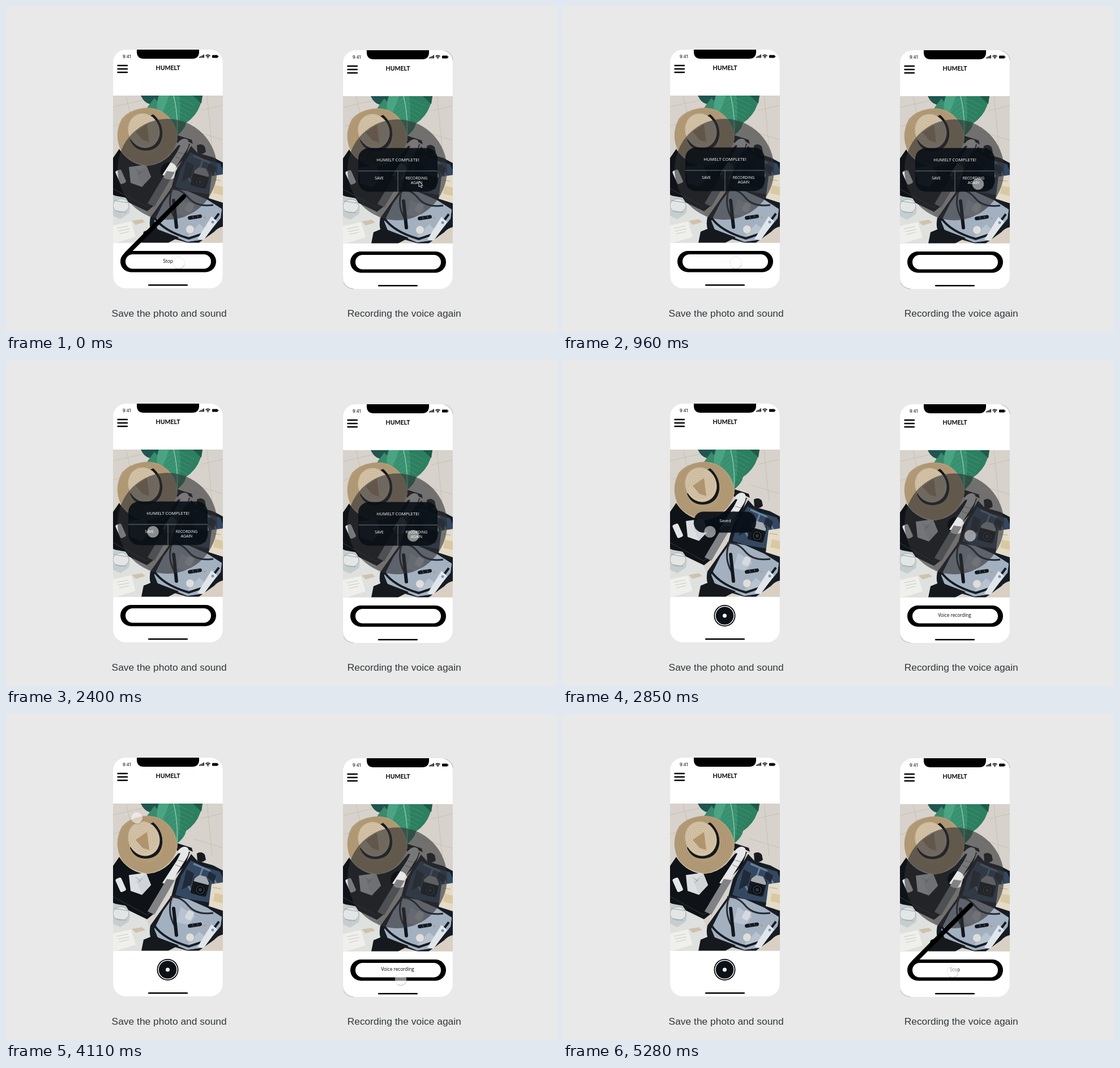
An HTML page that plays this animation: 973x575 px, repeating every 5310 ms.

```html
<!DOCTYPE html>
<html lang="en">
<head>
<meta charset="utf-8">
<title>Voice photo app</title>
<style>
  html, body { margin: 0; width: 100%; height: 100%; overflow: hidden; background: #e9e9e9; }
  svg { display: block; }
  text { font-family: "Open Sans", "Noto Sans", sans-serif; }
  .mid text { text-anchor: middle; }
  .caption { font: 17.4px "Liberation Sans", Arial, sans-serif; fill: #32383c; }
  .title { font: 700 10.6px Lato, sans-serif; text-anchor: middle; }
  .mid .clock, .clock { font: 7.5px Inter, sans-serif; text-anchor: start; }
</style>
</head>
<body>
<svg id="stage" width="973" height="575" viewBox="0 0 973 575"></svg>
<script>
const LOOP = 5310;
const BRAND = "HUMELT";
const stage = document.getElementById("stage");
const repeat = (n, draw) => Array.from({ length: n }, (_, i) => draw(i)).join("");

const floor = `
  <rect x="189" y="158" width="194" height="260" fill="#d7d2cb"/>
  <path d="M189 333L248 362 262 400 240 418H189Z" fill="#dfe1df"/>
  <path d="M383 388L340 418H383Z" fill="#d9d0c3"/>
  <g stroke="#bfb8ae" stroke-width=".7" fill="none">
    <path d="M189 178l52-12M189 212l18-6M212 158l7 30M330 220l53 16M355 158l9 92M345 184l38-9"/>
  </g>`;

const leaves = `
  <path d="M238 158Q244 171 254 173L249 181Q250 192 257 198L280 178 284 158Z" fill="#1f5650"/>
  <path d="M249 180Q251 193 260 199L274 176 262 162Z" fill="#3a8a6c"/>
  <path d="M270 158Q262 180 272 197Q274 206 286 209Q290 224 302 228Q311 223 318 206Q336 194 343 174L347 158Z" fill="#379070"/>
  <path d="M306 158Q311 188 303 227Q316 218 318 206Q336 194 343 174L347 158Z" fill="#2c7f60"/>
  <path d="M330 158L345 172 347 158Z" fill="#1d5b47"/>
  <path d="M270 158Q262 180 272 197L281 177 288 158Z" fill="#4aa382"/>
  <g fill="none" stroke="#7cc39a" stroke-width=".5" opacity=".6">
    ${repeat(7, i => `<path d="M${299 + i * .4} ${161 + i * 8}q-14 7 -${25 - i * 2.5} ${20 - i}M${302 + i * .3} ${161 + i * 8}q13 5 ${31 - i * 3.6} ${14 - i}"/>`)}
  </g>
  <path d="M296 158Q304 190 302 227" fill="none" stroke="#9dd0b3" stroke-width="1.2"/>`;

const luggage = `
  <path d="M200 252Q213 274 239 281Q266 285 288 265L304 246 325 243 316 268 298 286 263 351 249 362 189 333V268Z" fill="#0f1317"/>
  <path d="M189 322L248 354 260 347" fill="none" stroke="#2b3034" stroke-width="1.2"/>
  <path d="M301 240L303 228 328 236 330 243 315 236 307 244Z" fill="#171a1d"/>
  <path d="M303 242Q312 230 321 236Q326 244 317 257L300 284Q296 297 284 301L276 298 302 258 308 246Z" fill="#e6e7e7"/>
  <path d="M304 258l11 3M299 266l10 4" stroke="#888" stroke-width="1"/>
  <path d="M284 291L298 293 262 354 250 348Z" fill="#808285"/>
  <path d="M217 284L247 280 256 301 240 319 220 312Z" fill="#dcdfe1"/>
  <path d="M230 294L248 281 256 302 240 319Z" fill="#d0d4d8"/>
  <path d="M229 288l9 7m-5 3l7-8" stroke="#959a9e"/>
  <rect x="197" y="289" width="11" height="25" rx="3" transform="rotate(-24 202 301)" fill="#e4e6e7"/>
  <path d="M337 246q8-5 14 2l2 9q-7 7-15 2z" fill="#171b20"/>`;

const bag = `
  <path d="M327 247L338 259 366 267 383 276V389Q374 391 368 398L340 418H322L260 400Q251 393 255 373L292 321 300 291Z" fill="#161c23"/>
  <path d="M326 258L348 269 378 278 383 289V312L362 333 320 326 299 319 309 286Z" fill="#344861"/>
  <path d="M331 264l28 12 16 30M315 291l14 24M348 270l-7 20" fill="none" stroke="#6a84a0" stroke-width="3"/>
  <path d="M319 274l13 7-5 20-17 9zM359 277l12 8-4 13-12-10z" fill="#202a38"/>
  <path id="cloth" d="M296 322L322 327 356 342 381 358 379 374 348 412 320 416 268 394 262 379 278 347Z" fill="#a3b0c0"/>
  <use href="#cloth" fill="url(#mesh)"/>
  <path d="M309 340l25 17-12 15-21-5zM321 405l20-21 14 12-15 12z" fill="#b9c3cf"/>
  <path d="M262 373Q278 397 323 410L350 401 376 366" fill="none" stroke="#161c23" stroke-width="4"/>
  <path d="M290 323Q308 321 322 338T366 351M293 324Q284 350 298 374" fill="none" stroke="#252c35" stroke-width="3"/>
  <path d="M296 343L301 390" stroke="#12171d" stroke-width="6" stroke-linecap="round"/>
  <rect x="321" y="369" width="25" height="6.5" rx="3" transform="rotate(-9 334 372)" fill="#151a20"/>
  <path d="M329 369l2 6m6-7l2 5" stroke="#53606f"/>
  <rect x="318" y="347" width="12" height="16" rx="3" transform="rotate(28 324 355)" fill="#d5dae0"/>
  <circle cx="325" cy="394" r="7.5" fill="#dedfdd" stroke="#aab0b5"/>
  <path d="M363 371L373 380 349 413 338 411Z" fill="#e1e6eb"/>
  <circle cx="365" cy="381" r="2.5" fill="#7d91b3"/>
  <g fill="#d78458"><circle cx="293" cy="331" r="1.5"/><circle cx="351" cy="373" r="1.5"/></g>
  <g transform="rotate(15 343 306)">
    <rect x="328" y="290" width="29" height="30" rx="4" fill="#15191d"/>
    <path d="M329 293l7-8h12l8 9v4h-27z" fill="#a5abb0"/>
    <circle cx="344" cy="310" r="10" fill="#0b0f12"/>
    <circle cx="344" cy="310" r="7" fill="none" stroke="#48525a"/>
    <circle cx="344" cy="310" r="3" fill="#283846"/>
  </g>
  <path d="M363 300L383 297V347L358 339Z" fill="#e4dbc8"/>
  <path d="M369 316L383 319V334L366 330Z" fill="#d9c9a2"/>
  <path d="M365 306l14 2" stroke="#b0a592"/>`;

const hat = `
  <path d="M237 181Q267 175 286 194Q303 211 303 235Q293 273 251 282Q214 276 202 253Q190 225 205 198Q218 184 237 181Z" fill="#b39b78"/>
  <g fill="none" stroke="#957d59" stroke-width=".7" opacity=".45">
    ${repeat(6, i => `<ellipse cx="248" cy="230" rx="${32 + i * 3.4}" ry="${34 + i * 2.7}"/>`)}
  </g>
  <path d="M219 236Q226 254 245 255Q272 255 276 229Q278 207 260 191L250 196Z" fill="#15181b"/>
  <ellipse cx="243.5" cy="220" rx="27.5" ry="31" transform="rotate(-23 243.5 220)" fill="#d3c2a6"/>
  <g fill="none" stroke="#b5a182" stroke-width=".7" opacity=".6">
    ${repeat(6, i => `<ellipse cx="242" cy="217" rx="${5 + i * 4}" ry="${6 + i * 4}" transform="rotate(-23 242 217)"/>`)}
  </g>
  <path d="M229 222L249 208 253 240 241 236Z" fill="#a4865c" opacity=".75"/>`;

const tableware = `
  <path d="M189 334L211 338Q222 351 217 366L202 376 189 370Z" fill="#c6cdce"/>
  <ellipse cx="203" cy="352" rx="14" ry="12" fill="#e3e6e5" stroke="#a4afb1"/>
  <path d="M191 343l24 4m-22 14l19 3" stroke="#98a4a7" stroke-width="1.2"/>
  <path d="M189 387L221 380 229 407 194 418H189Z" fill="#efefec"/>
  <path d="M196 392l20-4m-18 9l20-4m-18 9l17-4" stroke="#cbc9c5"/>
  <path d="M222 379l18-3 6 5-17 5z" fill="#cfc2ac"/>
  <path d="M243 398L260 391 305 408 286 418H239Z" fill="#15191d"/>`;

const chrome = `
  <rect x="189.3" y="77" width="193.4" height="421" rx="22" fill="#fff"/>
  <path d="M231 77H341V82Q340 93 329 93H243Q232 93 231 82Z"/>
  <text class="clock" x="206" y="91.5">9:41</text>
  ${repeat(4, i => `<rect x="${341 + i * 2.4}" y="${89.5 - i * 1.3}" width="1.7" height="${2 + i * 1.3}" rx=".4"/>`)}
  <path d="M352.5 88a5.5 5.5 0 0 1 8 0M354.3 89.7a3 3 0 0 1 4.4 0" fill="none" stroke="#000" stroke-width="1.3"/>
  <circle cx="356.5" cy="91.2" r="1"/>
  <rect x="364" y="86.5" width="10" height="5" rx="1.2"/><rect x="374.5" y="88" width="1" height="2"/>
  <path d="M197.5 105H214M197.5 111H214M197.5 117H214" stroke="#000" stroke-width="2.4" stroke-linecap="round"/>
  <text class="title" x="286" y="113">${BRAND}</text>
  <rect x="251" y="491" width="70" height="2.6" rx="1.3"/>
  <use href="#photo"/>`;

const phone = (id, dx, dy) => `
  <g id="${id}" class="mid" transform="translate(${dx} ${dy})">
    <use href="#chrome"/>
    <path class="disc" fill="#303032" fill-opacity=".6" fill-rule="evenodd"
      d="M197 288a88 89 0 1 0 176 0a88 89 0 1 0-176 0zM273 291a15 15 0 1 0 30 0a15 15 0 1 0-30 0z"/>
    <g class="pill">
      <rect x="202" y="432" width="169" height="37.5" rx="18.7"/>
      <path class="arm" d="M213 437H356" stroke="#000" stroke-width="8" stroke-linecap="round"/>
      <rect x="211" y="438" width="151" height="25.5" rx="12.7" fill="#fff"/>
      <text class="stop" x="286" y="452.7" font-size="8.4">Stop</text>
      <text class="voice" x="285.5" y="452.3" font-size="8.2">Voice recording</text>
    </g>
    <g class="camera">
      <circle cx="285.5" cy="451" r="19"/>
      <circle cx="285.5" cy="451" r="16.5" fill="#0b1116" stroke="#fff" stroke-width="1.5"/>
      <circle cx="285.5" cy="451" r="3.5" fill="#fff"/>
    </g>
    <g class="popup" fill="#fff">
      <rect x="216" y="249.5" width="140" height="77" rx="19" fill="#080f16" fill-opacity=".9"/>
      <path d="M216 290H356M286 290V326" stroke="#8b9094" stroke-width=".8"/>
      <text x="286" y="273" font-size="7.9">${BRAND} COMPLETE!</text>
      <g font-size="6.8">
        <text x="253" y="305">SAVE</text>
        <text x="319" y="305">RECORDING</text>
        <text x="319" y="313">AGAIN</text>
      </g>
    </g>
    <g class="saved" fill="#fff">
      <rect x="231" y="267.5" width="110" height="37" rx="17" fill="#080f16" fill-opacity=".93"/>
      <text x="286.5" y="286" font-size="7.3">Saved</text>
    </g>
  </g>
  <g id="${id}Touch">
    <path d="M-6 8.8A10.6 10.6 0 0 0 10 3.6" fill="none" stroke="#000" stroke-opacity=".2" stroke-width="1.2"/>
    <circle r="10.3" fill="#fff" fill-opacity=".52" stroke="#777" stroke-opacity=".28" stroke-width=".6"/>
  </g>`;

stage.innerHTML = `
  <defs>
    <clipPath id="frame"><rect x="189" y="158" width="194" height="259.5"/></clipPath>
    <pattern id="mesh" width="4" height="4" patternUnits="userSpaceOnUse" patternTransform="rotate(28)">
      <path d="M0 0H4M0 0V4" stroke="#8392a6" stroke-width=".6"/>
    </pattern>
    <g id="photo" clip-path="url(#frame)">${floor + leaves + luggage + bag + hat + tableware}</g>
    <g id="chrome">${chrome}</g>
  </defs>
  ${phone("left", 0, 0)}
  ${phone("right", 406, 1)}
  <path d="M596 488q4 10 18 11M775 79q13 4 14.5 16" fill="none" stroke="#999" stroke-width=".6"/>
  <path id="pointer" d="M729 309v10l2.4-2 1.6 3.5 1.7-.8-1.6-3.3h3z" fill="#111" stroke="#fff" stroke-width=".8"/>
  <text class="caption" x="186.6" y="548">Save the photo and sound</text>
  <text class="caption" x="602.7" y="548">Recording the voice again</text>`;

const leftPath = [[1130, 305, 453], [1700, 277, 366], [2230, 259.5, 303], [2950, 259.5, 303], [3510, 240, 225], [4110, 231, 183]];
const rightPath = [[1450, 733, 314], [2100, 719, 310], [2970, 719, 310], [3510, 701, 354], [4110, 697, 468], [4350, 692, 472], [4750, 688, 454]];

const ramp = (t, a, b) => Math.min(1, Math.max(0, (t - a) / (b - a)));
const ease = k => k * k * (3 - 2 * k);

function follow(t, path) {
  const i = path.findIndex(p => p[0] > t);
  if (i === 0) return path[0].slice(1);
  if (i < 0) return path[path.length - 1].slice(1);
  const a = path[i - 1], b = path[i], k = ease(ramp(t, a[0], b[0]));
  return [a[1] + (b[1] - a[1]) * k, a[2] + (b[2] - a[2]) * k];
}

const fade = (el, value) => el.setAttribute("opacity", value);

function pose(id, { lift, ...layers }) {
  const root = document.getElementById(id);
  for (const name in layers) fade(root.querySelector("." + name), layers[name]);
  root.querySelector(".arm").setAttribute("transform", `rotate(${-45 * lift} 213 437)`);
}

function touch(id, t, path, opacity) {
  const el = document.getElementById(id + "Touch");
  el.setAttribute("transform", `translate(${follow(t, path)})`);
  fade(el, opacity);
}

function draw(now) {
  const t = now % LOOP;
  const stopped = ease(ramp(t, 600, 930));
  const tapped = ramp(t, 2620, 2780);
  pose("left", {
    lift: 1 - stopped,
    arm: 1 - ramp(t, 920, 960),
    stop: 1 - ramp(t, 650, 970),
    voice: 0,
    popup: stopped * (1 - tapped),
    disc: 1 - tapped,
    pill: 1 - tapped,
    camera: tapped,
    saved: tapped * (1 - ramp(t, 3180, 3380)),
  });
  touch("left", t, leftPath, 1 - ramp(t, 4250, 4500));

  const lift = ease(ramp(t, 4890, 5220));
  pose("right", {
    lift,
    arm: lift > 0 ? 1 : 0,
    stop: ramp(t, 5020, 5240),
    voice: tapped * (1 - ramp(t, 4880, 5040)),
    popup: 1 - tapped,
    disc: 1,
    pill: 1,
    camera: 0,
    saved: 0,
  });
  const handover = ramp(t, 300, 420);
  fade(document.getElementById("pointer"), 1 - handover);
  touch("right", t, rightPath, handover);
}

const start = performance.now();
function tick() {
  draw(performance.now() - start);
  requestAnimationFrame(tick);
}
tick();
</script>
</body>
</html>
```
